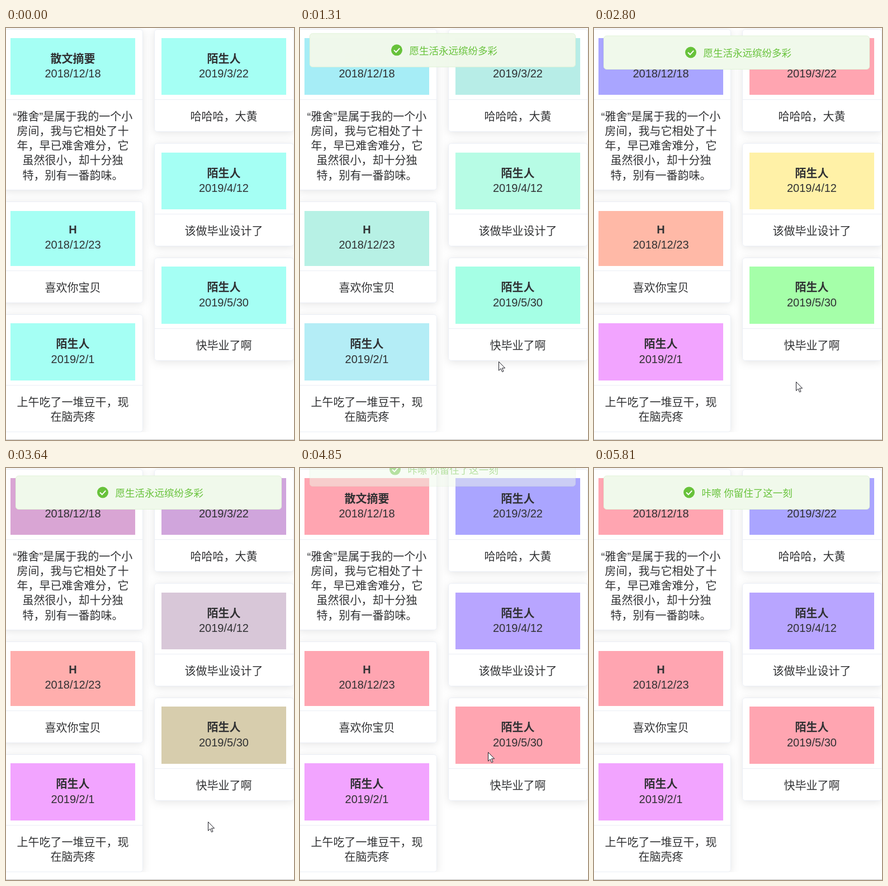
These frames come from a looping animation (515x734 px, 6130 ms). An HTML page:

```html
<!DOCTYPE html>
<html lang="zh-CN">
<head>
<meta charset="utf-8">
<title>留言墙</title>
<style>
  html, body { margin: 0; width: 100%; height: 100%; overflow: hidden; background: #fff; }
  svg { display: block; width: 100%; height: 100%; }
  text { font: 20px "Liberation Sans", "Noto Sans CJK SC", "Noto Sans CJK", sans-serif; fill: #303133; white-space: pre; }
  .title { font-weight: bold; }
  .banner text { font-size: 17.5px; fill: #67c23a; }
</style>
</head>
<body>
<svg id="stage" viewBox="0 0 515 734">
  <defs>
    <filter id="shadow" x="-20%" y="-20%" width="140%" height="140%">
      <feDropShadow dx="0" dy="2.5" stdDeviation="7.5" flood-color="#000" flood-opacity=".1"/>
    </filter>
    <clipPath id="page"><rect width="515" height="720"/></clipPath>
  </defs>
  <g id="wall" clip-path="url(#page)"></g>
  <rect y="733" width="515" height="1" fill="#c4c4c4"/>
  <g id="banners"></g>
  <path id="cursor" d="M.5 .5V16.2L4.1 12.8 6.6 18.6 9 17.6 6.5 11.9H11.6Z" fill="#fff" stroke="#1c1c24" stroke-width="1"/>
</svg>
<script>
const LOOP = 6130;
const STEP = 64.1;
const CYAN = [165, 255, 244];
const PINK = [255, 165, 177];
const COLOR_TIME = 2000;
const COLOR_STARTS = [945, 2985];

// x, top, bottom, header bottom, block top, block bottom, texts, colours after each change
const cards = [
  { x: -4.5, y: [2.5, 288.5], rule: 127, block: [18, 119], title: "散文摘要", date: "2018/12/18",
    lines: ["“雅舍”是属于我的一个小", "房间，我与它相处了十", "年，早已难舍难分，它", "虽然很小，却十分独", "特，别有一番韵味。"],
    colors: [[169, 165, 255], PINK] },
  { x: -4.5, y: [309.5, 489.5], rule: 432, block: [326, 424], title: "H", date: "2018/12/23",
    lines: ["喜欢你宝贝"], colors: [[255, 185, 167], PINK] },
  { x: -4.5, y: [510.5, 719.5], rule: 636, block: [526, 628], title: "陌生人", date: "2019/2/1",
    lines: ["上午吃了一堆豆干，现", "在脑壳疼"], colors: [[242, 164, 255], [242, 164, 255]] },
  { x: 265.5, y: [2.5, 184.5], rule: 127, block: [18, 119], title: "陌生人", date: "2019/3/22",
    lines: ["哈哈哈，大黄"], colors: [[255, 165, 177], [170, 165, 255]] },
  { x: 265.5, y: [205.5, 388.5], rule: 331, block: [222, 323], title: "陌生人", date: "2019/4/12",
    lines: ["该做毕业设计了"], colors: [[255, 241, 167], [184, 165, 255]] },
  { x: 265.5, y: [409.5, 592.5], rule: 535, block: [425, 527], title: "陌生人", date: "2019/5/30",
    lines: ["快毕业了啊"], colors: [[165, 255, 169], PINK] }
];

const banners = [
  { text: "愿生活永远缤纷多彩", icon: 173, enter: 985, leave: 4022 },
  { text: "咔嚓 你留住了这一刻", icon: 170, enter: 4762, leave: Infinity }
];

// time, x, y of the pointer tip
const pointer = [
  [167, 422, 702], [300, 388, 640], [450, 360, 570], [600, 343, 525], [744, 337, 507],
  [808, 335.5, 505.5], [936, 335.5, 505.5], [1000, 339, 517.5], [1260, 355, 595], [1500, 361, 630],
  [4020, 361, 630], [4141, 361, 596], [4270, 351, 553], [4460, 339, 515], [4600, 336, 506],
  [4910, 336, 506], [5100, 355, 560], [5350, 405, 660], [5550, 430, 706], [5810, 447, 736]
];

function add(parent, tag, attrs, text) {
  const el = document.createElementNS("http://www.w3.org/2000/svg", tag);
  for (const key in attrs) el.setAttribute(key, attrs[key]);
  if (text) el.textContent = text;
  parent.appendChild(el);
  return el;
}

const clamp = v => Math.min(1, Math.max(0, v));
const mix = (a, b, p) => a + (b - a) * p;

// CSS "ease": cubic-bezier(.25, .1, .25, 1)
function ease(x) {
  x = clamp(x);
  let lo = 0, hi = 1;
  for (let i = 0; i < 20; i++) {
    const s = (lo + hi) / 2, r = 1 - s;
    if (.75 * r * r * s + .75 * r * s * s + s ** 3 < x) lo = s; else hi = s;
  }
  const s = (lo + hi) / 2, r = 1 - s;
  return .3 * r * r * s + 3 * r * s * s + s ** 3;
}

const wall = document.getElementById("wall");
const cursor = document.getElementById("cursor");

for (const card of cards) {
  const { x, y: [top, bottom], block: [blockTop, blockBottom] } = card;
  add(wall, "rect", { x, y: top, width: 249, height: bottom - top, rx: 5,
    fill: "#fff", stroke: "#ebeef5", filter: "url(#shadow)" });
  add(wall, "rect", { x, y: card.rule, width: 249, height: 1, fill: "#ebeef5" });
  card.fill = add(wall, "rect", { x: x + 12.5, y: blockTop, width: 223, height: blockBottom - blockTop });
  const label = (text, y, cls) =>
    add(wall, "text", { x: x + 124, y, "text-anchor": "middle", class: cls }, text);
  const middle = (blockTop + blockBottom) / 2;
  label(card.title, middle + (card.title === "H" ? -9 : -7), "title");
  label(card.date, middle + (card.title === "H" ? 18 : 19.5), "date");
  card.lines.forEach((line, i) => label(line, card.rule + 37.5 + i * 26.25, "line"));
}

for (const b of banners) {
  b.el = add(document.getElementById("banners"), "g", { class: "banner" });
  add(b.el, "rect", { x: 17.5, y: 14, width: 475, height: 59.5, rx: 5, fill: "#f0f9eb", stroke: "#e1f3d8" });
  add(b.el, "circle", { cx: b.icon, cy: 43.5, r: 10, fill: "#67c23a" });
  add(b.el, "path", { d: `M${b.icon - 5} 43.5l3.8 3.8 6.4-7`, fill: "none", stroke: "#fff", "stroke-width": 2 });
  add(b.el, "text", { x: b.icon + 22.5, y: 50.7 }, b.text);
}

function colorAt(card, t) {
  let color = CYAN;
  card.colors.forEach((next, i) => {
    const p = ease((t - COLOR_STARTS[i]) / COLOR_TIME);
    color = color.map((c, k) => mix(c, next[k], p));
  });
  return `rgb(${color.map(Math.round)})`;
}

function placeBanner(b, t) {
  const leaving = t >= b.leave;
  const age = t - (leaving ? b.leave : b.enter);
  const shown = d => leaving ? 1 - ease(age / d) : ease(age / d);
  b.el.setAttribute("opacity", shown(300));
  b.el.setAttribute("transform", `translate(0 ${-60 * (1 - shown(400))})`);
}

function placeCursor(t) {
  const i = pointer.findIndex(p => p[0] > t);
  cursor.style.display = i > 0 ? "" : "none";
  if (i < 1) return;
  const [t0, x0, y0] = pointer[i - 1], [t1, x1, y1] = pointer[i];
  const p = (t - t0) / (t1 - t0);
  cursor.setAttribute("transform", `translate(${Math.round(mix(x0, x1, p))} ${Math.round(mix(y0, y1, p))})`);
}

function draw(now) {
  const t = 1000 + Math.floor((now % LOOP - 992) / STEP) * STEP;
  for (const card of cards) card.fill.setAttribute("fill", colorAt(card, t));
  for (const b of banners) placeBanner(b, t);
  placeCursor(t);
}

const start = performance.now();
function tick() {
  draw(performance.now() - start);
  requestAnimationFrame(tick);
}
tick();
</script>
</body>
</html>
```
